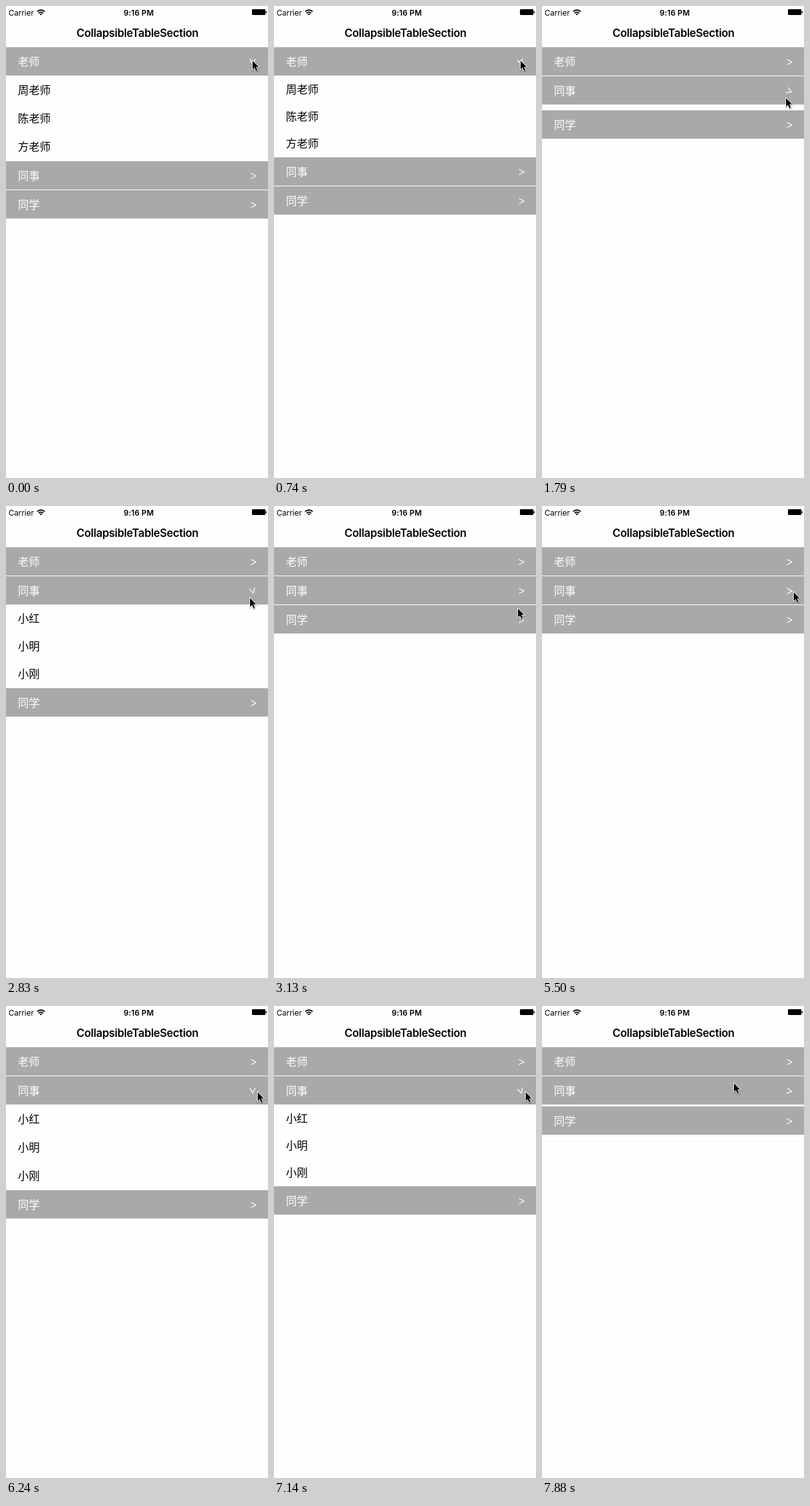
Recreate the animation shown at these times as an HTML page. Size 408 by 733 pixels, loop 8000 ms.

```html
<!DOCTYPE html>
<html lang="zh">
<head>
<meta charset="utf-8">
<title>CollapsibleTableSection</title>
<style>
  html, body { margin: 0; width: 100%; height: 100%; overflow: hidden; background: #fefefe; }
  svg { overflow: hidden; }
  #stage { display: block; }
  .latin { font-family: Inter, Roboto, sans-serif; font-size: 12px; }
  .bold { font-weight: 600; text-anchor: middle; letter-spacing: 0.12px; }
  .title { font-size: 17px; letter-spacing: -0.3px; }
  .cjk { font: 17px "Noto Sans CJK SC", "Noto Sans CJK", sans-serif; }
  .mark { fill: none; stroke: #fff; stroke-width: 1.25; }
</style>
</head>
<body>
<svg id="stage" width="408" height="733" viewBox="0 0 408 733">
  <defs>
    <path id="arrow" d="M1 2v13.2l3-2.8 2.2 5 2.3-1-2.2-4.8h4.1z"/>
  </defs>
  <rect width="408" height="733" fill="#fefefe"/>
  <text class="latin" x="4" y="15">Carrier</text>
  <g fill="none" stroke="#000" stroke-width="1.9">
    <path d="M48.6 8.7a8.2 8.2 0 0 1 11.6 0M50.9 11.2a5 5 0 0 1 7 0"/>
    <path d="M54.4 14.6l-1.9-2a2.7 2.7 0 0 1 3.8 0z" fill="#000" stroke="none"/>
  </g>
  <text class="latin bold" x="206.7" y="15">9:16 PM</text>
  <rect x="383" y="5" width="21" height="9" rx="1.4"/>
  <rect x="404.6" y="8" width="1.4" height="3.5" rx=".7"/>
  <text class="latin bold title" x="204.8" y="48">CollapsibleTableSection</text>
  <g id="table"></g>
  <rect id="hairline" width="408" height="1" fill="#f4f4f4"/>
  <g id="cursor">
    <use href="#arrow" x=".3" y="1" stroke="#0003" stroke-width="3"/>
    <use href="#arrow" stroke="#fff" stroke-width="1.8" paint-order="stroke"/>
  </g>
</svg>
<script>
const LOOP = 8000, STEP = 145, SLIDE = 300, SPIN = 200;
const TOP = 64, HEAD = 44, ROW = 44, GAP = 1;

const groups = [
  ['老师', '周老师', '陈老师', '方老师'],
  ['同事', '小红', '小明', '小刚'],
  ['同学', '苏小禾', '何小溪', '林语晴', '栗子', '大力']
];

// Taps alternately open and close a group; the pointer then goes to spot.
const rest = [383, 83], second = [379, 141], third = [379, 174];
const aside = [391, 132], away = [298, 118];
const taps = [
  { at: -1000, group: 0, spot: rest },
  { at: 740, group: 0, spot: second },
  { at: 1790, group: 1, spot: second, lead: 47 },
  { at: 2830, group: 1, spot: third, steps: 4, lead: 29 },
  { at: 3730, group: 2, spot: third },
  { at: 4920, group: 2, spot: aside, steps: 5 },
  { at: 5950, group: 1, spot: aside },
  { at: 7140, group: 1, spot: away, steps: 4 },
  { at: 7880, group: 1, spot: away, lead: 23 }
];

const byId = id => document.getElementById(id);
const clamp = v => Math.min(1, Math.max(0, v));
const ease = v => (1 - Math.cos(Math.PI * clamp(v))) / 2;
const mix = (a, b, v) => a + (b - a) * v;

function set(el, attrs) {
  for (const key in attrs) el.setAttribute(key, attrs[key]);
}

function add(parent, tag, attrs, text) {
  const el = document.createElementNS('http://www.w3.org/2000/svg', tag);
  set(el, attrs);
  if (text) el.textContent = text;
  return parent.appendChild(el);
}

const sections = groups.map(([name, ...people]) => {
  const box = add(byId('table'), 'g', {});
  add(box, 'rect', { width: 408, height: HEAD, fill: '#a9a9a9' });
  add(box, 'text', { class: 'cjk', x: 18.4, y: 28.7, fill: '#fff' }, name);
  const mark = add(box, 'path', { class: 'mark', d: 'M-3.6 -3.3L4.2 1L-3.6 5.3' });
  const rows = people.map(person => {
    const view = add(box, 'svg', { width: 408 });
    const label = add(view, 'text', { class: 'cjk', x: 18.4 }, person);
    return { view, label };
  });
  return { box, mark, rows };
});

function draw(time) {
  const index = taps.findLastIndex(tap => tap.at <= time);
  const { at, group, spot, steps = 3, lead = 40 } = taps[index];
  const step = Math.floor((time - at) / STEP);
  const elapsed = step * STEP + lead;
  const opening = index % 2 === 0;
  const moved = ease(elapsed / SLIDE);
  const spun = clamp(elapsed / SPIN);
  const amount = opening ? moved : 1 - moved;
  const angle = 90 * (opening ? spun : 1 - spun);

  let top = TOP;
  sections.forEach(({ box, mark, rows }, i) => {
    const height = i === group ? ROW * amount : 0;
    const turn = i === group ? angle : 0;
    set(box, { transform: `translate(0 ${Math.round(top)})` });
    set(mark, { transform: `translate(385 22) rotate(${turn})` });
    rows.forEach(({ view, label }, n) => {
      set(view, { y: HEAD + n * height, height });
      set(label, { y: height / 2 + 6.5, opacity: height > 8 ? 1 : 0 });
    });
    top += HEAD + rows.length * height + GAP;
  });

  // A faint separator trails the table as it starts to slide.
  const shift = moved * ROW * sections[group].rows.length;
  set(byId('hairline'), { y: Math.round(top + 3 + 2.6 * shift), opacity: step ? 0 : 1 });

  const from = taps[Math.max(0, index - 1)].spot;
  const travel = clamp((step - 1) / (steps - 2));
  const [x, y] = spot.map((v, i) => mix(from[i], v, travel));
  set(byId('cursor'), { transform: `translate(${x} ${y})` });
}

const start = performance.now();
function tick() {
  draw((performance.now() - start) % LOOP);
  requestAnimationFrame(tick);
}
tick();
</script>
</body>
</html>
```
